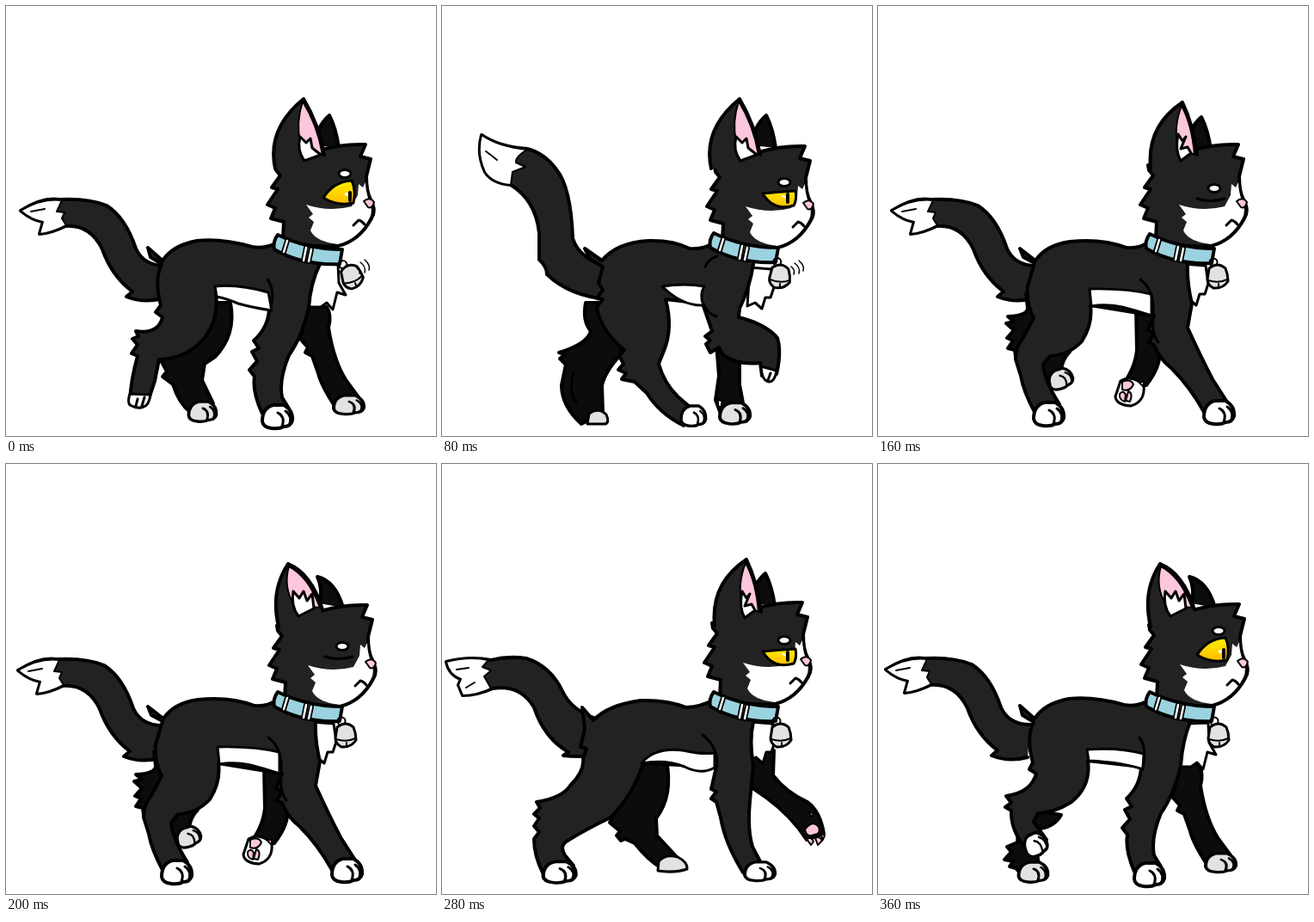
Write an HTML page without scripts that moves like this. It is 500 px wide and 500 px high and loops after 0.4 s.

```html
<!DOCTYPE html>
<html lang="en">
<head>
<meta charset="utf-8">
<title>Walking cat</title>
<style>
html, body { margin: 0; width: 100%; height: 100%; overflow: hidden; background: #fff; }
svg { display: block; width: 100%; height: 100%; }
.ink { stroke: #000; stroke-width: 4; stroke-linejoin: round; stroke-linecap: round; }
.fur { fill: #222; }
.far { fill: #0c0c0c; }
.white { fill: #fff; }
.grey { fill: #e2e2e2; }
.pink { fill: #fcc6dd; }
.line { fill: none; }
.thin { stroke-width: 2; }
.mid { stroke-width: 3; }
.bare { stroke: none; }
.frame { opacity: 0; animation: show .4s step-end infinite; animation-delay: calc((var(--i) - 10) * 40ms); }
@keyframes show { 0% { opacity: 1 } 10%, 100% { opacity: 0 } }
</style>
</head>
<body>
<svg viewBox="0 0 500 500">
<defs>
  <linearGradient id="gold" x2="0" y2="1"><stop stop-color="#ffed00"/><stop offset="1" stop-color="#ffbd00"/></linearGradient>

  <g id="paw">
    <path d="M-17,5Q-17,-11-4,-14L8,-14Q19,-8 18,4Q16,11 8,11Q3,14-6,13Q-16,12-17,5Z"/>
    <path class="line mid" d="M6,11Q10,-1 1,-5M14,10Q19,-1 10,-7"/>
  </g>

  <!-- tails -->
  <g id="tailLow">
    <path class="fur" d="M185,302Q160,302 151,282Q139,246 117,232Q95,223 62,225Q42,222 17,238Q30,249 43,251L39,265Q53,264 69,256Q98,254 112,283Q123,314 147,332L140,338Q160,346 182,340"/>
    <path class="white thin" d="M17,238Q42,223 65,226L59,239L68,240L65,247L70,255Q53,264 39,265L43,251Q30,249 17,238Z"/>
    <path class="line thin" d="M29,239L45,236"/>
  </g>
  <g id="tailFork">
    <path class="fur" d="M192,302Q163,292 153,270Q139,241 111,232Q90,229 70,234Q45,229 18,236Q21,251 35,256L32,263L37,275Q54,275 72,267Q104,262 120,289Q132,325 160,341L154,345Q170,347 190,345"/>
    <path class="white thin" d="M18,236Q45,229 67,234L60,242L70,246L62,253L70,267Q54,275 37,275L32,263L35,256Q21,251 18,236Z"/>
    <path class="line thin" d="M30,245L44,243M41,266L51,260"/>
  </g>
  <g id="tailUp">
    <path class="fur" d="M192,304Q159,293 152,270Q150,211 133,190Q119,171 99,166Q66,164 46,150Q40,172 50,193Q58,206 80,208Q109,226 113,264L113,295Q122,303 122,312Q148,337 192,341"/>
    <path class="white thin" d="M46,150Q66,164 99,167Q85,175 86,182L97,187L82,193L80,208Q58,206 50,193Q40,172 46,150Z"/>
    <path class="line thin" d="M51,169Q58,174 64,179"/>
  </g>
  <g id="tailCurl">
    <path class="fur" d="M190,304Q161,299 154,268Q152,205 126,188Q110,179 87,173Q55,162 41,145Q37,174 52,190Q61,203 72,206Q97,216 110,242Q120,269 116,296Q121,304 127,314L142,327L139,334Q160,343 188,341"/>
    <path class="white thin" d="M41,145Q56,162 84,172L77,178L85,186L70,184L74,192L62,190L68,204Q58,201 52,190Q37,174 41,145Z"/>
    <path class="line thin" d="M48,166L58,178"/>
  </g>

  <!-- ears -->
  <path id="farEar" class="far" d="M359,162Q361,140 376,127Q384,143 387,165"/>
  <path id="farEarBack" class="far" d="M364,162Q369,147 362,131Q383,136 392,167"/>
  <g id="earTall">
    <path class="fur" d="M313,189Q303,143 346,108Q364,138 370,173"/>
    <path class="pink thin" d="M345,111Q337,135 342,158L368,173Q362,138 345,111Z"/>
    <path class="white mid" d="M342,152L349,159L354,154L356,165L366,173L347,180Q338,168 342,152Z"/>
  </g>
  <g id="earFront">
    <path class="fur" d="M317,189Q312,140 354,112Q367,139 371,173"/>
    <path class="pink thin" d="M353,116Q343,142 349,164L368,173Q365,138 353,116Z"/>
    <path class="white mid" d="M349,149L354,157L358,152L352,166L360,164L364,171L352,180Q345,168 349,149Z"/>
  </g>
  <g id="earBack">
    <path class="fur" d="M317,189Q307,148 328,116Q355,127 368,169"/>
    <path class="pink thin" d="M329,119Q322,143 335,164L365,167Q352,131 329,119Z"/>
    <path class="white mid" d="M334,148L341,156L346,148L350,159L356,151L358,168L340,177Q331,165 334,148Z"/>
  </g>

  <g id="face">
    <path class="fur" d="M313,185L314,191L319,197L309,211L316,213L304,231L313,235L308,247L323,251L322,270Q350,282 386,279Q411,273 425,247Q431,238 424,225Q419,216 419,198L424,178L412,175L418,161Q390,160 364,168"/>
    <path class="fur bare" d="M313,187L338,158L366,168L350,190Z"/>
    <path class="white bare" d="M349,231L357,242L352,246L358,251L354,261Q360,274 386,277Q410,271 423,246Q427,238 422,226Q418,215 418,205L415,211L410,207L409,220L402,233Q376,240 349,231Z"/>
    <path class="line mid" d="M404,255L410,249Q414,250 417,254"/>
    <path class="pink thin" d="M416,227Q423,221 428,228Q426,236 421,234Z"/>
  </g>

  <!-- eyes, each with its brow -->
  <ellipse id="brow" class="white mid" rx="7" ry="4.5"/>
  <g id="eyeOpen">
    <use href="#brow" x="394" y="195"/>
    <path class="mid" fill="url(#gold)" d="M369,223Q381,204 402,203Q407,213 404,229Q385,233 369,223Z"/>
    <path class="line" d="M400,217V226"/><circle class="white bare" cx="396" cy="219" r="2"/>
  </g>
  <g id="eyeHalf">
    <use href="#brow" x="396" y="205"/>
    <path class="mid" fill="url(#gold)" d="M371,218Q390,216 409,215Q411,225 407,232Q383,239 371,218Z"/>
    <path class="line" d="M400,219V228"/><path class="line thin" style="stroke:#fff" d="M394,221L397,222"/>
  </g>
  <g id="eyeSlim">
    <use href="#brow" x="396" y="206"/>
    <path class="mid" fill="url(#gold)" d="M365,223Q384,219 407,218L405,228Q380,232 365,223Z"/>
    <path class="line" d="M401,221V225"/>
  </g>
  <g id="eyeShut">
    <use href="#brow" x="391" y="212"/>
    <path class="line mid" d="M371,224Q386,229 403,224"/>
  </g>

  <!-- collar and bell -->
  <g id="collar">
    <path fill="#9bd2df" d="M316,265Q350,282 391,282L388,299Q345,301 312,282Q310,273 316,265Z"/>
    <path class="line" style="stroke-width:6" d="M327,272L323,285M349,280L346,295M355,282L352,296"/>
    <path class="line" style="stroke:#fff;stroke-width:2.5" d="M327,272L323,285M349,280L346,295M355,282L352,296"/>
  </g>
  <g id="bell" class="thin">
    <circle class="line" cx="-5" cy="-16" r="4.5"/>
    <path class="grey mid" d="M-10,-9Q0,-17 9,-9Q12,-2 12,6Q6,15-5,14Q-12,10-12,4Z"/>
    <path class="line" d="M-11,5Q1,9 11,4M1,9V13"/>
  </g>
  <path id="jingle" class="line" stroke-width="1.5" d="M409,302Q414,306 412,311M413,298Q420,303 418,310M418,295Q425,301 423,307"/>
  <path id="chest" class="white mid" d="M360,300L386,299L387,322L395,336L385,333L380,353L373,345L366,350L350,350Z"/>
  <path id="chestSlim" class="white mid" d="M358,300L383,302L386,323L382,335L376,335L372,348L364,341L355,345Z"/>

  <!-- planted front leg shared by two poses -->
  <g id="farFront">
    <path class="far" d="M349,345L373,350Q379,359 375,374Q381,413 396,436L410,455L382,465Q366,440 363,427L356,407L348,403L351,397L341,386L345,378Z"/>
    <use href="#paw" class="grey" transform="translate(398 464)scale(1 .8)"/>
  </g>

  <!-- poses: far legs, chest, body, belly, paws -->
  <g id="trailing">
    <path class="far" d="M210,345H261Q268,382 243,408L231,416L228,435L241,462L214,472Q201,462 194,440L182,431L187,425L180,412Z"/>
    <use href="#paw" class="grey" transform="translate(228 472)scale(.92 .85)"/>
    <use href="#farFront"/>
    <use href="#chest"/>
    <path class="fur" d="M365,300Q354,322 352,351Q344,385 329,406Q317,435 321,455L329,468L298,474Q286,448 289,431L283,423L292,413L286,402L294,398L288,389Q305,374 306,352L244,334Q248,363 231,386Q210,410 178,411L173,436L165,460L144,460Q145,435 153,407L146,404L153,394L147,387L154,384L151,378Q177,382 182,362L174,356L180,348Q172,318 181,300L168,292L165,281L182,296Q194,278 222,273Q251,270 286,280Q302,283 318,274"/>
    <path class="white mid" d="M243,326Q270,323 305,333L309,354Q288,351 270,346Q256,340 245,338Z"/>
    <path class="line mid" d="M304,318Q313,330 308,350"/>
    <path class="white mid" d="M144,451L168,452Q166,465 160,466Q153,469 144,464Q141,460 144,451ZM158,465L161,455M151,465L153,457"/>
    <use href="#paw" class="white" transform="translate(315 478)"/>
  </g>

  <g id="lifting">
    <path class="far" d="M167,345H205L209,404Q190,424 186,441L187,473L162,486Q139,465 139,441L144,417L137,410L143,405L136,403Q169,393 173,378Q163,366 167,345Z"/>
    <path class="line mid" d="M153,426Q147,451 156,461"/>
    <path class="grey mid" d="M171,474Q182,466 191,475Q195,484 190,486H169Z"/>
    <path class="far" d="M318,380H346V440L351,467L324,474L318,458L322,430Z"/>
    <use href="#paw" class="grey" transform="translate(340 474)scale(1 .9)"/>
    <path class="white mid" d="M320,457L326,459L325,467L321,466Z"/>
    <use href="#chestSlim" transform="translate(0 4)"/>
    <path class="fur" d="M362,300Q358,327 346,352L345,362Q377,370 390,386Q395,402 389,428L372,430L370,415Q344,418 327,406L322,397L312,403L307,393L312,389L306,384L314,378L303,346L260,341Q269,374 258,401L252,416Q258,438 274,454L288,466L281,488Q253,474 238,450L224,437L209,434L214,427L205,423L211,416L206,407L212,400Q184,377 180,350L187,341L180,340L187,330L182,322L187,303L172,294L166,282L186,296Q203,275 240,273Q268,272 288,282Q305,283 314,276"/>
    <path class="white mid" d="M256,326Q282,322 305,326Q299,336 304,348Q279,349 256,326Z"/>
    <path class="line mid" d="M304,346Q309,358 319,361M320,291Q310,294 306,303"/>
    <path class="white mid" d="M371,419L389,424Q387,437 380,437Q372,436 371,419ZM379,435L382,427"/>
    <use href="#paw" class="white" transform="translate(292 477)scale(.82 .86)"/>
  </g>

  <g id="reaching">
    <path class="far" d="M177,344H210L211,386Q190,413 187,442L188,470L171,483Q146,471 143,447Q141,424 150,407L144,402L151,396L143,385Q176,384 181,371Q173,363 177,344Z"/>
    <path class="line mid" d="M155,421Q149,443 158,458"/>
    <path class="grey mid" d="M172,470Q183,462 188,470Q191,479 182,482L170,484Z"/>
    <path class="far" d="M312,350H342L338,440L343,465L318,474Q305,454 309,436L308,412L312,408L307,400Z"/>
    <use href="#paw" class="grey" transform="translate(337 474)scale(1 .9)"/>
    <path class="white mid" d="M316,459L321,460V467L316,466Z"/>
    <use href="#chestSlim"/>
    <path class="fur" d="M362,300Q354,324 364,348L371,379Q381,413 398,434L406,454L378,463Q365,433 350,414L340,402L334,405L335,392L328,390Q325,375 323,360L267,345Q276,371 260,391Q249,403 240,406Q249,435 265,452L276,465L261,482Q243,470 232,444L211,410L200,409L207,402L196,401L205,395L198,390Q208,388 208,381Q192,373 191,345L178,344L188,334L181,328L189,321L183,317L186,306L175,299L171,286L185,299Q204,276 238,275L288,283Q304,281 314,275"/>
    <path class="white mid" d="M263,325Q286,335 312,331L322,357Q286,363 266,345Z"/>
    <path class="line mid" d="M304,318Q321,336 323,361"/>
    <use href="#paw" class="white" transform="translate(394 469)rotate(-14)scale(.95 1)"/>
    <use href="#paw" class="white" transform="translate(274 476)scale(.86 .9)"/>
  </g>

  <g id="passing">
    <path class="far" d="M172,335L195,350L223,402Q214,411 213,424L200,434L160,408L159,400L151,398L157,389L150,386L158,377L149,369L158,367L151,361Q174,360 174,351Z"/>
    <use href="#paw" class="grey" transform="translate(212 434)rotate(-18)scale(.8 .82)"/>
    <path class="far" d="M300,352H328L327,403Q329,419 312,441L281,445Q299,423 301,400Z"/>
    <path class="white mid" d="M282,436Q295,428 309,441Q311,460 294,465Q277,464 276,454Z"/>
    <path class="pink thin" d="M284,437Q294,433 297,440Q293,449 284,446ZM304,438L309,436V443ZM281,451Q285,446 288,452L287,460Q280,458 281,451ZM291,448Q297,450 293,460L288,459Z"/>
    <use href="#chestSlim" transform="translate(-2 0)"/>
    <path class="fur" d="M360,300Q359,321 365,346L360,374Q375,407 389,434L407,462L379,472Q363,443 342,422Q326,409 321,394L315,391L321,381L314,377L321,360L247,348Q250,369 237,390Q222,406 200,407L192,417Q194,437 211,463L182,472Q169,448 166,430L160,411Q160,396 168,387L181,363Q172,345 174,326L182,299L169,292L165,282L183,296Q195,278 223,274Q260,270 289,281Q305,282 313,275"/>
    <path class="white mid" d="M246,329Q289,328 318,335V360Q300,354 284,350Q265,346 248,349Z"/>
    <path class="line mid" d="M305,318Q322,330 320,360Q318,382 326,391"/>
    <use href="#paw" class="white" transform="translate(396 473)"/>
    <use href="#paw" class="white" transform="translate(198 475)"/>
  </g>

  <g id="striding">
    <path class="far" d="M229,350L261,345Q269,386 249,412L250,432L274,458L254,469Q240,461 224,441L213,436L208,438L203,432L207,427L195,417Z"/>
    <path class="grey mid" d="M252,462Q260,453 274,457Q286,463 285,471Q270,476 251,473Z"/>
    <path class="far" d="M360,340L386,333L385,362Q400,382 425,393Q440,404 444,430L424,437Q406,409 377,388L360,376Z"/>
    <path class="pink thin" d="M422,425Q431,413 438,422Q441,430 433,431Q424,435 422,425ZM427,405L433,406L429,410ZM424,436Q430,433 432,439L429,443ZM434,435Q439,432 442,438L437,443ZM440,429L445,432L443,437Z"/>
    <use href="#chestSlim" transform="translate(1 0)"/>
    <path class="fur" d="M362,300Q357,322 362,350L358,392Q355,425 361,445L372,466L350,475Q329,441 324,411L319,393L313,389L319,381L313,378L319,352L234,348Q222,385 196,411Q167,425 146,438Q136,444 143,455L153,467L117,475Q107,455 107,436L113,428L107,421L113,412L107,407L114,400L110,393Q140,388 149,374Q166,357 164,342L168,331L161,329L166,308L163,283L176,298Q193,280 231,275Q261,274 284,283Q302,282 314,275"/>
    <path class="white mid" d="M232,348Q247,329 280,333Q302,338 317,336V353Q302,362 282,352Q260,343 232,348Z"/>
    <path class="line mid" d="M303,315Q321,328 320,352"/>
    <use href="#paw" class="white" transform="translate(369 474)scale(1 .8)"/>
    <use href="#paw" class="white" transform="translate(136 475)scale(1.08 .9)"/>
  </g>

  <g id="swinging">
    <path class="far" d="M165,400L213,408Q205,422 188,424L184,443L187,468L166,476L160,470L153,468L157,462L147,460L155,451L150,445L162,440Z"/>
    <use href="#paw" class="grey" transform="translate(180 475)scale(.97 .85)"/>
    <use href="#farFront"/>
    <use href="#chest" transform="translate(-2 2)"/>
    <path class="fur" d="M363,300Q354,322 352,351Q344,385 329,406Q317,435 321,455L329,468L298,474Q287,448 290,431L284,423L293,413L287,402L295,398L289,389Q305,374 306,352L244,345Q248,374 225,393Q204,406 186,406L181,416L196,437L171,446Q154,425 155,403L148,399L155,394L149,386Q178,382 184,360L176,355L180,347Q172,318 181,300L168,292L165,281L182,296Q194,278 222,273Q251,270 286,280Q302,283 316,274"/>
    <path class="white mid" d="M243,332Q280,329 309,337L308,355Q285,347 245,345Z"/>
    <path class="line mid" d="M304,318Q313,330 308,352"/>
    <use href="#paw" class="white" transform="translate(183 443)rotate(-25)scale(.75 .95)"/>
    <use href="#paw" class="white" transform="translate(315 478)"/>
  </g>
</defs>

<rect width="500" height="500" fill="#fff"/>
<g class="ink">
  <g class="frame" style="--i:0">
    <use href="#tailLow"/><use href="#trailing"/>
    <use href="#farEar"/><use href="#face"/><use href="#earTall"/><use href="#eyeOpen"/>
    <use href="#collar" y="1"/><use href="#bell" transform="translate(402 314)rotate(-20)"/><use href="#jingle" x="-1"/>
  </g>
  <g class="frame" style="--i:1">
    <use href="#tailLow" x="-2"/><use href="#swinging"/>
    <use href="#farEar"/><use href="#face" x="2"/><use href="#earTall"/><use href="#eyeHalf"/>
    <use href="#collar"/><use href="#bell" transform="translate(397 314)rotate(-8)"/>
  </g>
  <g class="frame" style="--i:2">
    <use href="#tailUp"/><use href="#lifting"/>
    <use href="#farEar" x="1"/><use href="#face" x="4" y="2"/><use href="#earTall"/><use href="#eyeHalf" x="2"/>
    <use href="#collar" y="-1"/><use href="#bell" transform="translate(393 314)rotate(6)"/><use href="#jingle" x="-3" y="1"/>
  </g>
  <g class="frame" style="--i:3">
    <use href="#tailFork"/><use href="#reaching"/>
    <use href="#farEar" y="2"/><use href="#face" x="1"/><use href="#earFront"/><use href="#eyeSlim"/>
    <use href="#collar"/><use href="#bell" transform="translate(395 314)"/>
  </g>
  <g class="frame" style="--i:4">
    <use href="#tailLow" x="-1"/><use href="#passing"/>
    <use href="#farEar" y="2"/><use href="#face" x="1"/><use href="#earFront"/><use href="#eyeShut"/>
    <use href="#collar"/><use href="#bell" transform="translate(395 314)"/>
  </g>
  <g class="frame" style="--i:5">
    <use href="#tailLow" x="-3" y="2"/><use href="#passing"/>
    <use href="#farEarBack"/><use href="#face" x="2" y="3"/><use href="#earBack"/><use href="#eyeShut"/>
    <use href="#collar"/><use href="#bell" transform="translate(395 315)"/>
  </g>
  <g class="frame" style="--i:6">
    <use href="#tailFork" x="-13" y="-9"/><use href="#striding"/>
    <use href="#farEar"/><use href="#face" x="1"/><use href="#earFront"/><use href="#eyeSlim"/>
    <use href="#collar"/><use href="#bell" transform="translate(395 316)"/>
  </g>
  <g class="frame" style="--i:7">
    <use href="#tailFork" x="-13" y="-6"/><use href="#striding"/>
    <use href="#farEar"/><use href="#face" x="1"/><use href="#earFront" y="-1"/><use href="#eyeHalf" x="2"/>
    <use href="#collar"/><use href="#bell" transform="translate(394 315)"/>
  </g>
  <g class="frame" style="--i:8">
    <use href="#tailCurl"/><use href="#trailing" transform="translate(1 14)scale(1 .96)"/>
    <use href="#farEar" y="1"/><use href="#face" x="3"/><use href="#earTall" y="-2"/><use href="#eyeOpen" x="1"/>
    <use href="#collar" y="-1"/><use href="#bell" transform="translate(402 315)rotate(-18)"/><use href="#jingle" x="3" y="1"/>
  </g>
  <g class="frame" style="--i:9">
    <use href="#tailLow" x="-8" y="1"/><use href="#swinging"/>
    <use href="#farEarBack"/><use href="#face" x="2" y="2"/><use href="#earBack"/><use href="#eyeOpen" x="2" y="-1"/>
    <use href="#collar"/><use href="#bell" transform="translate(396 315)"/>
  </g>
</g>
</svg>
</body>
</html>
```
